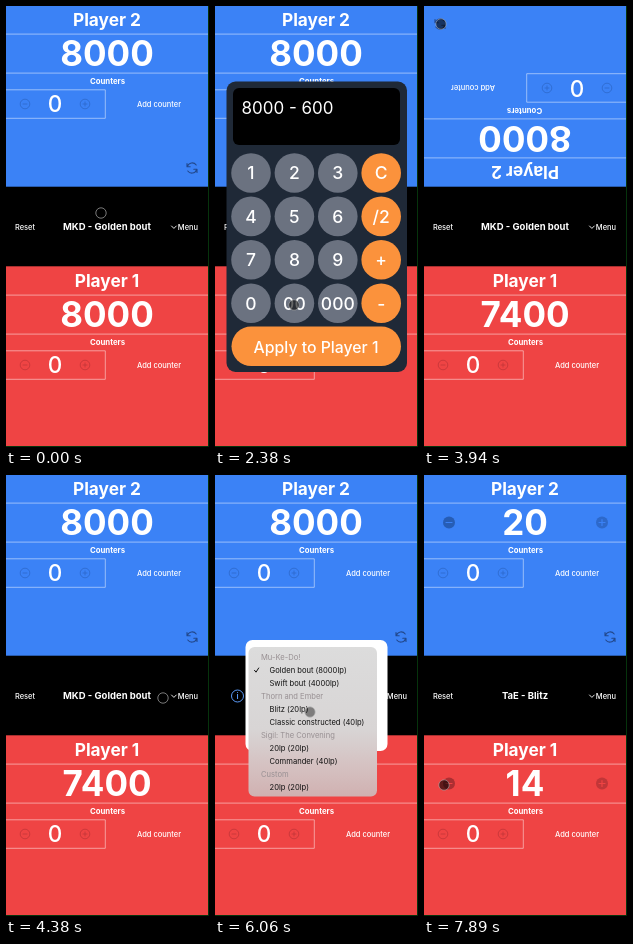
An HTML page for the animation above (7.97 s loop, 203 px wide and 441 px high).

```html
<!DOCTYPE html>
<html lang="en">
<head>
<meta charset="utf-8">
<title>Life counter</title>
<style>
  html, body { margin: 0; width: 100%; height: 100%; overflow: hidden; background: #000; }
  svg { display: block; width: 100%; height: 100%; font-family: Inter, Roboto, sans-serif; }
</style>
</head>
<body>
<svg id="stage" viewBox="0 0 203 441" preserveAspectRatio="none"></svg>
<script>
const LOOP = 7970;
const stage = document.getElementById('stage');

function add(parent, tag, attrs = {}, content = '') {
  const node = document.createElementNS('http://www.w3.org/2000/svg', tag);
  for (const key in attrs) node.setAttribute(key, attrs[key]);
  node.textContent = content;
  return parent.appendChild(node);
}
const group = (parent, attrs) => add(parent, 'g', attrs);

// Places text by the vertical middle of its capitals.
function label(parent, text, x, middle, size, options = {}) {
  return add(parent, 'text', {
    x, y: middle + size * 0.364, 'font-size': size, fill: '#fff', 'text-anchor': 'middle', ...options
  }, text);
}

function box(parent, x, y, width, height, fill, rx = 0) {
  return add(parent, 'rect', { x, y, width, height, fill, rx });
}

function path(parent, d, stroke, width) {
  return add(parent, 'path', {
    d, stroke, 'stroke-width': width, fill: 'none', 'stroke-linecap': 'round', 'stroke-linejoin': 'round'
  });
}

function sign(parent, x, y, reach, plus, stroke, width) {
  path(parent, `M${x - reach} ${y}h${2 * reach}` + (plus ? `M${x} ${y - reach}v${2 * reach}` : ''), stroke, width);
}

function makePanel(name, top, color, dark) {
  const outer = group(stage);
  const g = group(outer, { transform: `translate(0 ${top})` });
  const edge = 'rgba(255,255,255,.6)';
  box(g, 0, -0.7, 202, 181.4, color);
  label(g, name, 101, 14, 17.3, { 'font-weight': 700 });
  path(g, 'M0 28.1H202M0 67.1H202M0 83.8H99.3V112.3H0', edge, 0.8);
  const life = label(g, '8000', 101, 47.7, 35, { 'font-weight': 700 });
  label(g, 'Counters', 101.5, 75.5, 7.8, { 'font-weight': 700 });
  label(g, '0', 49, 98, 22.5, { 'font-weight': 500 });
  label(g, 'Add counter', 153, 98, 7.5, { 'font-weight': 500 });
  [19, 79].forEach((x, i) => {
    const icon = group(g, { opacity: 0.5 });
    add(icon, 'circle', { cx: x, cy: 98, r: 4.8, fill: 'none', stroke: dark, 'stroke-width': 0.8 });
    sign(icon, x, 98, 2, i, dark, 0.8);
  });
  const steppers = group(g);
  [25, 178].forEach((x, i) => {
    add(steppers, 'circle', { cx: x, cy: 47.5, r: 6, fill: dark, opacity: i ? 0.5 : 0.75 });
    sign(steppers, x, 47.5, 3, i, color, 1.2);
  });
  return { outer, g, life, steppers };
}

function makeHeader() {
  const g = group(stage);
  const title = label(g, '', 101, 221, 9.5, { 'font-weight': 700 });
  const reset = label(g, 'Reset', 19, 221, 7.5, { 'font-weight': 500 });
  const info = group(g);
  const blue = '#5b9bf8';
  add(info, 'circle', { cx: 22.5, cy: 221, r: 6, fill: 'none', stroke: blue, 'stroke-width': 1 });
  label(info, 'i', 22.5, 221, 8, { 'font-weight': 600, fill: blue });
  path(g, 'M165.5 220l2.4 2.4 2.4-2.4', '#fff', 0.9);
  label(g, 'Menu', 182, 221, 7.5, { 'font-weight': 500 });
  return { title, reset, info };
}

function makeCalculator() {
  const g = group(stage);
  const orange = '#fb923c';
  box(g, 11.5, 75.5, 180.5, 290.5, '#1f2937', 9);
  box(g, 18, 82, 167, 57, '#000', 6);
  const display = label(g, '', 26.5, 102, 17, { 'text-anchor': 'start' });
  const keys = ['1', '2', '3', 'C', '4', '5', '6', '/2', '7', '8', '9', '+', '0', '00', '000', '-'];
  keys.forEach((key, i) => {
    const x = 36 + i % 4 * 43.4, y = 167 + Math.floor(i / 4) * 43.4;
    add(g, 'circle', { cx: x, cy: y, r: 19.8, fill: i % 4 === 3 ? orange : '#6b7280' });
    label(g, key, x, y, 17.5, { 'font-weight': 500 });
  });
  box(g, 16.5, 320.5, 169.5, 39.5, orange, 19.7);
  label(g, 'Apply to Player 1', 101, 341, 15.8, { 'font-weight': 500 });
  return { g, display };
}

function makeDialog() {
  const g = group(stage);
  box(g, 30.5, 165, 142, 111, '#fff', 7);
  label(g, 'Golden bout (8000lp)', 101, 221, 7.6, { fill: '#111' });
  return g;
}

function makePicker() {
  const g = group(stage);
  const shade = add(add(stage, 'defs'), 'linearGradient', { id: 'shade', x1: 0, y1: 0, x2: 0, y2: 1 });
  [[0, '#dcdcdc'], [0.55, '#d8d5d5'], [0.8, '#d5c1c1'], [1, '#d0b1b1']].forEach(([offset, color]) =>
    add(shade, 'stop', { offset, 'stop-color': color }));
  box(g, 33.5, 172, 128.5, 149.5, 'url(#shade)', 6);
  const rows = [
    '#Mu-Ke-Do!', 'Golden bout (8000lp)', 'Swift bout (4000lp)',
    '#Thorn and Ember', 'Blitz (20lp)', 'Classic constructed (40lp)',
    '#Sigil: The Convening', '20lp (20lp)', 'Commander (40lp)',
    '#Custom', '20lp (20lp)'
  ];
  rows.forEach((row, i) => {
    const heading = row[0] === '#';
    label(g, row.replace('#', ''), heading ? 46 : 54.5, 182 + i * 13, 7.6, {
      'text-anchor': 'start', fill: heading ? '#989093' : '#111'
    });
  });
  path(g, 'M39.5 195.3l1.5 1.9 2.7-4.2', '#111', 1);
  return g;
}

const header = makeHeader();
const playerOne = makePanel('Player 1', 261, '#ef4444', '#96282c');
const playerTwo = makePanel('Player 2', 0, '#3b82f6', '#20509f');
path(playerTwo.g, 'M181 157.5v3.2h3.2M191 166.5v-3.2h-3.2M181.4 160.2a5 5 0 0 1 8.8-1.2M190.6 163.8a5 5 0 0 1-8.8 1.2', '#22488c', 1.1);
path(stage, 'M202.5 0V440.5H0', '#06330c', 1);
const calculator = makeCalculator();
const dialog = makeDialog();
const picker = makePicker();
const pointer = add(stage, 'circle', { r: 5.2, fill: '#000', stroke: '#b4b4b4', 'stroke-width': 0.9 });

// Pointer stops: arrival, departure, x, y.
const stops = [
  [0, 60, 95, 207], [700, 980, 101, 308], [1120, 1180, 166, 297],
  [1330, 1660, 123, 212], [2150, 2430, 79, 299], [2680, 2820, 100, 341],
  [3200, 3480, 184, 161], [3860, 4080, 17, 18], [4380, 4385, 157, 223],
  [4500, 4640, 180, 221], [4900, 5080, 101, 221], [5350, 5560, 101, 225],
  [6020, 6220, 95, 237], [6490, 6800, 180, 305], [7120, LOOP, 20, 310]
];
const plusPresses = [6620, 6740];
const minusPresses = Array.from({ length: 8 }, (_, i) => 7220 + i * 90);
const presses = [820, 1140, 1350, 2280, 2740, 3280, 3980, 4560, 4980, 5450, 6150, ...plusPresses, ...minusPresses];

const clamp = v => Math.max(0, Math.min(1, v));
const smooth = v => v * v * (3 - 2 * v);
const ramp = (t, from, to) => smooth(clamp((t - from) / (to - from)));
const between = (t, from, to) => t >= from && t < to;
const countPast = (times, t) => times.filter(time => t >= time).length;
const fade = (node, opacity) => {
  node.setAttribute('opacity', opacity);
  node.setAttribute('visibility', opacity > 0 ? 'visible' : 'hidden');
};

function pointerAt(t) {
  const next = stops.findIndex(stop => t < stop[0]);
  if (next < 0) return stops[stops.length - 1].slice(2);
  const [, leave, x, y] = stops[next - 1];
  const [arrive, , toX, toY] = stops[next];
  const k = ramp(t, leave, arrive);
  return [x + (toX - x) * k, y + (toY - y) * k];
}

function render(t) {
  const blitz = t >= 6300;
  playerTwo.life.textContent = blitz ? 20 : 8000;
  playerOne.life.textContent = blitz
    ? 20 + countPast(plusPresses, t) - countPast(minusPresses, t)
    : t < 2780 ? 8000 : 7400;
  [playerOne, playerTwo].forEach(p => fade(p.steppers, blitz ? 1 : 0));

  const angle = 180 * (ramp(t, 3289, 3494) - ramp(t, 3990, 4200));
  playerTwo.outer.setAttribute('transform', `rotate(${angle} 101 90)`);

  const menuOpen = between(t, 4580, 6300);
  header.title.textContent = blitz ? 'TaE - Blitz' : 'MKD - Golden bout';
  fade(header.reset, menuOpen ? 0 : 1);
  fade(header.info, menuOpen ? 1 : 0);

  fade(calculator.g, ramp(t, 860, 980) - ramp(t, 2770, 2870));
  calculator.display.textContent =
    t < 1150 ? '8000' : t < 1360 ? '8000 -' : t < 2300 ? '8000 - 6' : '8000 - 600';
  fade(dialog, ramp(t, 4990, 5090) - ramp(t, 6270, 6360));
  fade(picker, ramp(t, 5470, 5570) - ramp(t, 6170, 6270));

  const [x, y] = pointerAt(t);
  const pressed = presses.some(time => between(t, time - 40, time + 120));
  pointer.setAttribute('cx', x);
  pointer.setAttribute('cy', y);
  pointer.setAttribute('fill-opacity', pressed ? 0.6 : 0.42);
  pointer.setAttribute('stroke-opacity', pressed ? 0.6 : 0.75);
}

const start = performance.now();
function tick() {
  render((performance.now() - start) % LOOP);
  requestAnimationFrame(tick);
}
tick();
</script>
</body>
</html>
```
